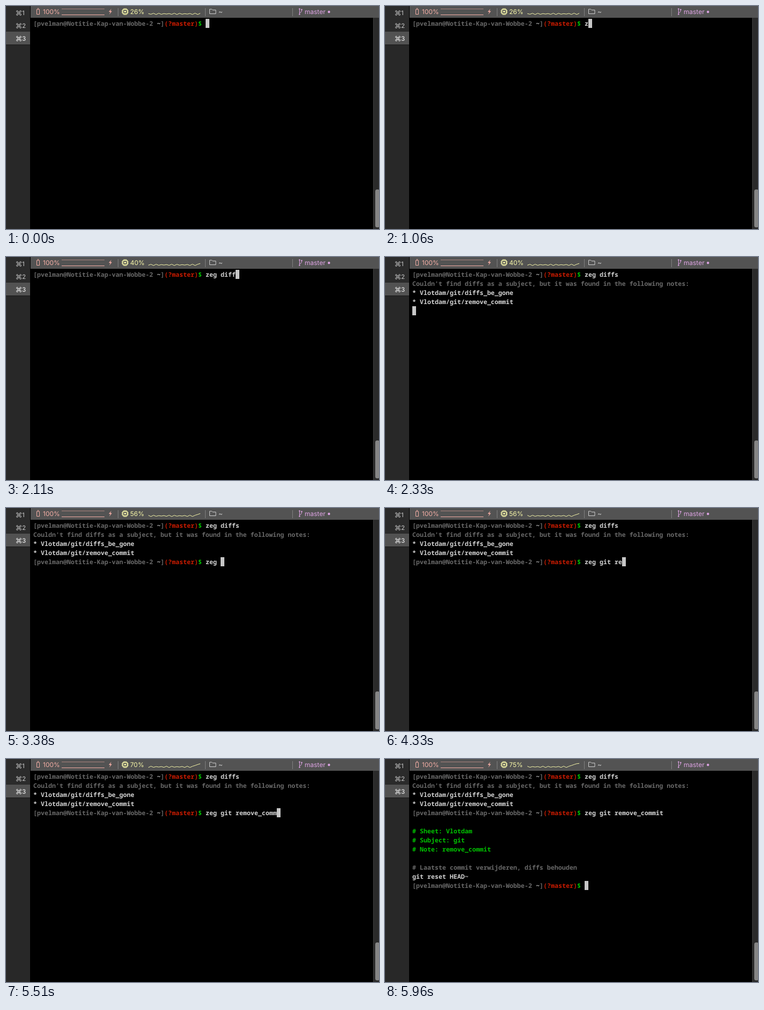
An HTML page that plays this animation: 697 px wide and 417 px high, repeating every 8.48 s.

```html
<!DOCTYPE html>
<html lang="en">
<head>
<meta charset="utf-8">
<title>Terminal notes</title>
<style>
  html, body { margin: 0; width: 100%; height: 100%; overflow: hidden; background: #000; }
  svg { display: block; width: 100%; height: 100%; }
  text { white-space: pre; text-rendering: geometricPrecision; }
  .ui { font: 12px Inter, "Open Sans", sans-serif; }
  .tab { font: 500 11.5px Inter, "Open Sans", sans-serif; }
  .term { font: 600 11.667px "Noto Sans Mono", "DejaVu Sans Mono", monospace; }
  .line { fill: none; stroke-width: 1; }
</style>
</head>
<body>
<svg viewBox="0 0 697 417">
  <defs>
    <path id="command" class="line" d="M-1.5-3a1.5 1.5 0 1 0-1.5 1.5h6a1.5 1.5 0 1 0-1.5-1.5v6a1.5 1.5 0 1 0 1.5-1.5h-6a1.5 1.5 0 1 0 1.5 1.5z"/>
  </defs>
  <rect width="697" height="417"/>

  <rect width="45" height="417" fill="#282828"/>
  <g id="tabs"></g>

  <rect x="46" width="651" height="22" fill="#535353"/>
  <path class="line" stroke="#808080" d="M209.5 4v15M372.5 4v15M535.5 4v15"/>

  <g fill="#f5aea5" stroke="#f5aea5">
    <path class="line" d="M57.5 6.5h5v9h-5zM58.5 4.5h3"/>
    <path class="line" d="M104 16.5h80"/>
    <path class="line" d="M104 5.5h80" opacity=".55"/>
    <path stroke="none" d="M197 5l-5 6h3l-2 5 5-6.5h-3z"/>
    <text class="ui" stroke="none" x="69" y="15">100%</text>
  </g>

  <g fill="#f6f6a8" stroke="#f6f6a8">
    <path class="line" style="stroke-width:1.5" d="M218.5 6.5h8v8h-8z"/>
    <path class="line" d="M220.5 4v2M222.5 4v2M224.5 4v2M220.5 15v2M222.5 15v2M224.5 15v2M216 8.5h2M216 10.5h2M216 12.5h2M227 8.5h2M227 10.5h2M227 12.5h2"/>
    <rect x="221" y="9" width="3" height="3" stroke="none"/>
    <text id="load" class="ui" stroke="none" x="232" y="15"></text>
    <path id="graph" class="line"/>
  </g>

  <path class="line" stroke="#d0d0d0" d="M380.5 14.5v-8.5h4l1.5 1.5h6v7z"/>
  <text class="ui" x="397" y="15" fill="#d8d8d8">~</text>

  <g fill="#dda3e3" stroke="#dda3e3">
    <path class="line" d="M548.5 6v10M548.5 12.5q4 0 4-5"/>
    <circle cx="548.5" cy="5.5" r="1.2" stroke="none"/>
    <circle cx="552.5" cy="6.8" r="1.3" stroke="none"/>
    <circle cx="548.5" cy="15.5" r="1.2" stroke="none"/>
    <text class="ui" stroke="none" x="558" y="15">master</text>
    <circle cx="603.5" cy="11" r="2.2" stroke="none"/>
  </g>

  <rect x="686" y="22" width="11" height="395" fill="#2a2a2a"/>
  <path class="line" stroke="#3c3c3c" d="M686.5 22v395"/>
  <rect x="690" y="343" width="8" height="71" rx="3.5" fill="#858585"/>

  <g id="screen" class="term"></g>
  <rect id="cursor" width="7" height="17" fill="#c7c7c7"/>
</svg>
<script>
const LOOP = 8480, LEFT = 51, TOP = 24, CELL = 7, ROW = 17;
const GRAY = '#686868', WHITE = '#d2d2d2', RED = '#c91b00', GREEN = '#00c200';
const $ = id => document.getElementById(id);

// Each pair is a time and the number of characters typed by then.
const typing = (text, steps) => steps.map(([time, count]) => [time, text.slice(0, count)]);
const FIRST = typing('zeg diffs', [[0, 0], [1060, 1], [1150, 2], [1250, 3], [1350, 4],
  [1530, 5], [1780, 7], [2110, 8], [2190, 9]]);
const SECOND = typing('zeg git remove_commit', [[3090, 0], [3200, 1], [3290, 3], [3380, 4],
  [3650, 6], [3830, 8], [4330, 10], [4350, 11], [4560, 12], [4630, 14], [5090, 16],
  [5370, 17], [5510, 19], [5570, 20], [5710, 21]]);
const LOAD = [[0, 26], [1620, 40], [3090, 56], [4350, 70], [5570, 75]];

const reached = (steps, t) => steps.filter(([time]) => time <= t);
const current = (steps, t) => reached(steps, t).pop()[1];

const prompt = command => [
  [GRAY, '[pvelman@Notitie-Kap-van-Wobbe-2 '], [WHITE, '~'], [GRAY, ']'],
  [RED, '(?master)'], [GREEN, '$ '], [WHITE, command]
];

// The cursor always follows the last line.
function terminal(t) {
  const lines = [prompt(current(FIRST, t))];
  if (t >= 2330) lines.push(
    [[GRAY, "Couldn't find diffs as a subject, but it was found in the following notes:"]],
    [[WHITE, '* Vlotdam/git/diffs_be_gone']],
    [[WHITE, '* Vlotdam/git/remove_commit']]);
  if (t >= 3090) lines.push(prompt(current(SECOND, t)));
  if (t >= 5790) lines.push([],
    [[GREEN, '# Sheet: Vlotdam']],
    [[GREEN, '# Subject: git']],
    [[GREEN, '# Note: remove_commit']]);
  if (t >= 5870) lines.push([],
    [[GRAY, '# Laatste commit verwijderen, diffs behouden']],
    [[WHITE, 'git reset HEAD~']]);
  if (t >= 5960) lines.push(prompt(''));
  else if (t >= 5710 || (t >= 2270 && t < 3090)) lines.push([]);
  return lines;
}

function drawTerminal(lines) {
  let markup = '', column = 0;
  lines.forEach((line, row) => {
    column = 0;
    for (const [color, text] of line) {
      markup += `<text x="${LEFT + column * CELL}" y="${TOP + 13 + row * ROW}" fill="${color}">${text}</text>`;
      column += text.length;
    }
  });
  $('screen').innerHTML = markup;
  $('cursor').setAttribute('x', LEFT + column * CELL);
  $('cursor').setAttribute('y', TOP + (lines.length - 1) * ROW);
}

function drawLoad(values) {
  const intervals = 20, newest = values.length - 1;
  const idle = i => 9 + (i % 2 ? 0 : 15) + 4 * Math.sin(i * 2.3);
  const points = Array.from({ length: intervals + 1 }, (_, k) => {
    const i = newest - intervals + k;
    const value = i < 0 ? idle(i) : values[i];
    return `${266 + k * 97 / intervals} ${(16.5 - value * 0.11).toFixed(2)}`;
  });
  $('graph').setAttribute('d', 'M' + points.join('L'));
  $('load').textContent = values[newest] + '%';
}

$('tabs').innerHTML = [1, 2, 3].map(n => {
  const y = (n - 1) * 24, active = n === 3, color = active ? '#e4e4e4' : '#b4b4b4';
  return `<rect y="${y}" width="45" height="24" fill="${active ? '#525252' : '#2b2b2b'}"/>
    <path class="line" stroke="#181818" d="M0 ${y + 24.5}h45"/>
    <use href="#command" x="24" y="${y + 13}" stroke="${color}"/>
    <text class="tab" x="30" y="${y + 17}" fill="${color}">${n}</text>`;
}).join('');

const times = [...FIRST, ...SECOND, ...LOAD].map(([time]) => time)
  .concat(2270, 2330, 5790, 5870, 5960);
let shown = -1;

function render(t) {
  const step = Math.max(...times.filter(time => time <= t));
  if (step === shown) return;
  shown = step;
  drawTerminal(terminal(t));
  drawLoad(reached(LOAD, t).map(([, value]) => value));
}

const start = performance.now();
function tick() {
  render((performance.now() - start) % LOOP);
  requestAnimationFrame(tick);
}
tick();
</script>
</body>
</html>
```
